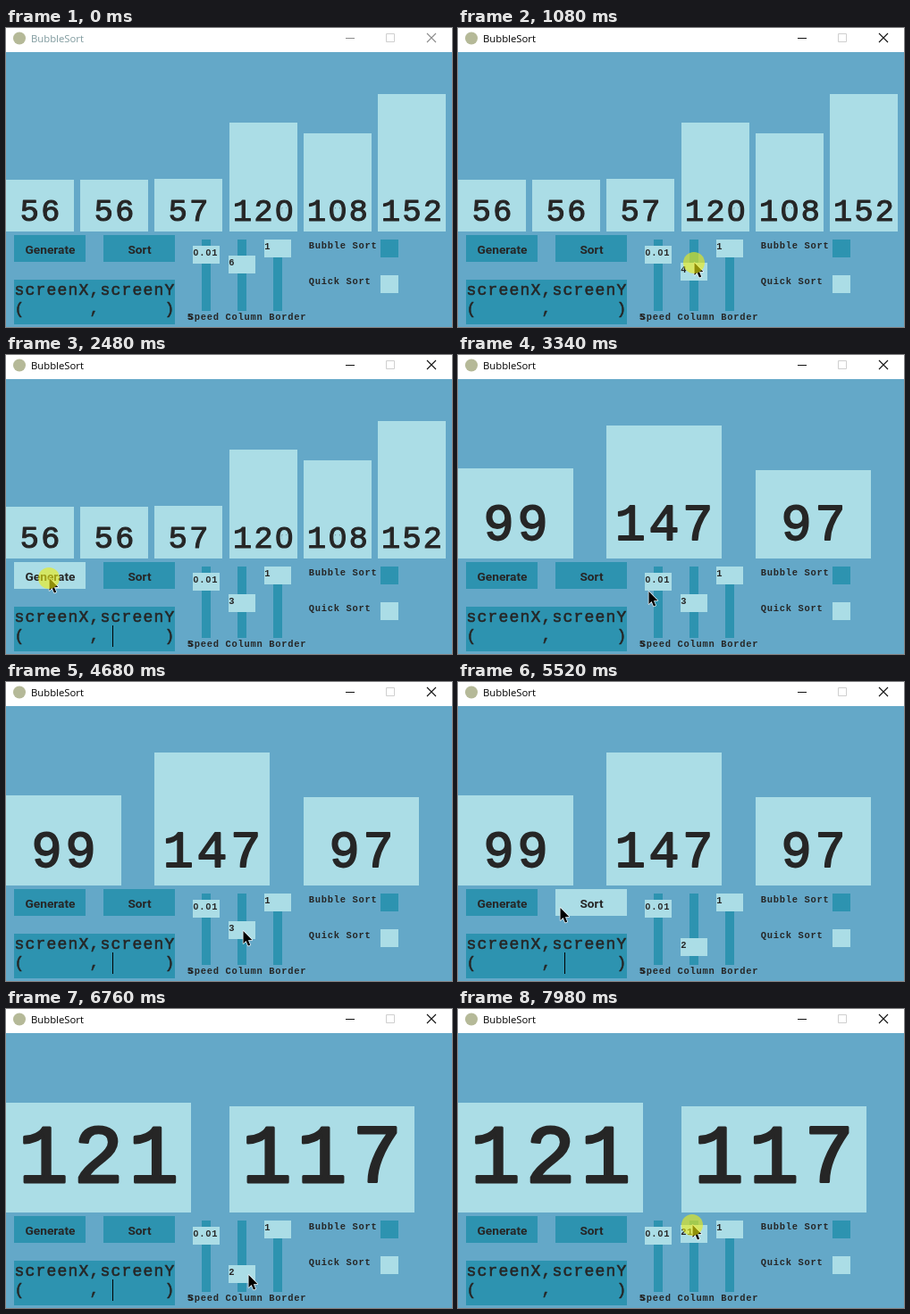
Animation, 499 px wide and 335 px high, one loop 8000 ms. Source, as an HTML page with a canvas:

```html
<!DOCTYPE html>
<html lang="en">
<head>
<meta charset="utf-8">
<title>BubbleSort</title>
<style>
html, body { margin: 0; width: 100%; height: 100%; overflow: hidden; background: #64a8c8; }
canvas { display: block; width: 499px; height: 335px; }
</style>
</head>
<body>
<canvas id="stage" width="499" height="335"></canvas>
<script>
const ctx = document.getElementById('stage').getContext('2d');
const LOOP = 8000, STEP = 78, FIRST = 60;
const BG = '#64a8c8', LIGHT = '#abdde6', DARK = '#2d93b0', INK = '#262626';

// Pointer moves: each eases from the previous resting place
const entry = { x: 397, y: 309 };
const moves = [
  { from: 60, to: 460, x: 265, y: 257 },
  { from: 620, to: 1500, x: 264, y: 268 },
  { from: 1800, to: 2475, x: 48, y: 250 },
  { from: 2805, to: 3570, x: 260, y: 261 },
  { from: 3650, to: 4660, x: 265, y: 279 },
  { from: 4755, to: 5110, x: 265, y: 287 },
  { from: 5110, to: 5690, x: 74, y: 237 },
  { from: 6075, to: 6690, x: 271, y: 298 },
  { from: 6910, to: 7930, x: 262, y: 242 }
];
const drags = [[615, 1640], [4755, 5110], [6910, LOOP]];
const clicks = [[2475, 2550], [5905, 5980]];

const charts = [
  { from: 0, width: 76, size: 39, base: 217, values: [56, 56, 57, 120, 108, 152] },
  { from: 2550, width: 129, size: 63, base: 208, values: [99, 147, 97] },
  { from: 5905, width: 207, size: 103, base: 196, values: [121, 117] }
];

const during = t => ([a, b]) => t >= a && t < b;

function pointer(t) {
  let { x, y } = entry;
  for (const m of moves) {
    if (t < m.from) break;
    const f = Math.min(1, (t - m.from) / (m.to - m.from));
    const s = f * f * (3 - 2 * f);
    const sag = Math.abs(m.x - x) * 0.18 * s * (1 - s);
    x += (m.x - x) * s;
    y += (m.y - y) * s + sag;
  }
  return { x: Math.round(x), y: Math.round(y) };
}

function columnY(t) {
  let y = 255;
  for (const [a, b] of drags) if (t >= a) y = pointer(Math.min(t, b)).y;
  return y;
}

function rect(x, y, w, h, color) {
  ctx.fillStyle = color;
  ctx.fillRect(x, y, w, h);
}

function text(str, x, y, font, color = INK, align = 'left') {
  ctx.font = font;
  ctx.textAlign = align;
  ctx.fillStyle = color;
  ctx.fillText(str, x, y);
}

// Typewriter text: one glyph per cell, thickened with a round outline
function mono(str, x, y, size, weight = 'normal') {
  const cell = size * 0.6, glyph = size * 0.9;
  const line = weight === 'bold' ? 0 : size * 0.03;
  const base = y - line / 2;
  [...str].forEach((c, i) => {
    const cx = x + (i + 0.5) * cell;
    text(c, cx, base, `${weight} ${glyph}px "Liberation Mono", monospace`, INK, 'center');
    if (line) {
      ctx.strokeStyle = INK;
      ctx.lineWidth = line;
      ctx.lineJoin = 'round';
      ctx.strokeText(c, cx, base);
    }
    if (c === '0') {
      // Clear the dot inside the zero
      ctx.fillStyle = LIGHT;
      ctx.beginPath();
      ctx.ellipse(cx, base - glyph * 0.33, glyph * 0.09, glyph * 0.12, 0, 0, 7);
      ctx.fill();
    }
  });
}

const label = (str, x, y) => mono(str, x, y, 11.6, 'bold');

function titleBar(active) {
  rect(0, 0, 499, 27, '#fff');
  ctx.fillStyle = '#b5b998';
  ctx.beginPath();
  ctx.arc(15, 11.5, 7, 0, 7);
  ctx.fill();
  text('BubbleSort', 28, 16, '11.3px "Open Sans", sans-serif', active ? '#000' : '#7f9a9e');
  const tone = active ? '#111' : '#8c8c8c';
  rect(380, 11, 10, 1, tone);
  ctx.lineWidth = 1;
  ctx.strokeStyle = '#cfcfcf';
  ctx.strokeRect(425.5, 6.5, 9, 9);
  ctx.strokeStyle = tone;
  ctx.lineWidth = 1.1;
  ctx.beginPath();
  ctx.moveTo(471, 6); ctx.lineTo(481, 16);
  ctx.moveTo(481, 6); ctx.lineTo(471, 16);
  ctx.stroke();
}

function bars(t) {
  const { width, size, base, values } = charts.filter(c => t >= c.from).pop();
  values.forEach((v, i) => {
    const x = Math.floor(i * 500 / values.length), str = String(v);
    rect(x, 226 - v, width, v + 2, LIGHT);
    mono(str, x + width / 2 - str.length * size * 0.3, base, size);
  });
}

function button(str, x, p) {
  const over = p && p.x >= x && p.x < x + 80 && p.y >= 232 && p.y < 262;
  rect(x, 232, 80, 30, over ? LIGHT : DARK);
  text(str, x + 40.5, 252.5, 'bold 13.7px Roboto, sans-serif', INK, 'center');
}

function slider(x, y, value) {
  rect(x + 10, 237, 10, 80, DARK);
  rect(x, y, 30, 20, LIGHT);
  label(value, x, y + 10.5);
}

function drawPointer({ x, y }, pressed) {
  ctx.save();
  ctx.translate(x, y);
  ctx.beginPath();
  ctx.moveTo(0.5, 0);
  ctx.lineTo(0.5, 14);
  ctx.lineTo(3.6, 11);
  ctx.lineTo(6, 16.5);
  ctx.lineTo(8.2, 15.5);
  ctx.lineTo(5.9, 10.2);
  ctx.lineTo(10.3, 10);
  ctx.closePath();
  ctx.strokeStyle = 'rgba(255,255,255,0.85)';
  ctx.lineWidth = 1.5;
  ctx.stroke();
  ctx.fillStyle = '#000';
  ctx.fill();
  if (pressed) {
    ctx.beginPath();
    ctx.arc(0, 0, 12, 0, 7);
    ctx.fillStyle = 'rgba(240,238,15,0.6)';
    ctx.fill();
  }
  ctx.restore();
}

function draw(time) {
  // The screen refreshes in even steps
  const t = time < FIRST ? 0 : FIRST + Math.floor((time - FIRST) / STEP) * STEP;
  const p = t >= FIRST ? pointer(t) : null;
  rect(0, 0, 499, 335, BG);
  titleBar(t >= 600);
  bars(t);
  button('Generate', 9, p);
  button('Sort', 109, p);

  rect(9, 282, 180, 50, DARK);
  mono('screenX,screenY', 9, 299, 20);
  mono('(      ,      )', 9, 320, 20);
  const blink = Math.floor((t - 385) / 502);
  if (blink >= 0 && blink % 2 === 0) rect(119, 303, 1, 24, '#000');

  const y = columnY(t);
  slider(209, 244, '0.01');
  slider(249, y, String(Math.round(105 / (y - 237))));
  slider(289, 237, '1');
  label('Speed Column Border', 203.5, 327);
  label('5', 202.5, 327);

  label('Bubble Sort', 338.5, 247);
  label('Quick Sort', 338.5, 287);
  rect(419, 237, 20, 20, DARK);
  rect(419, 277, 20, 20, LIGHT);

  if (p) drawPointer(p, [...drags, ...clicks].some(during(t)));
}

const start = performance.now();
function tick() {
  draw((performance.now() - start) % LOOP);
  requestAnimationFrame(tick);
}
tick();
</script>
</body>
</html>
```
